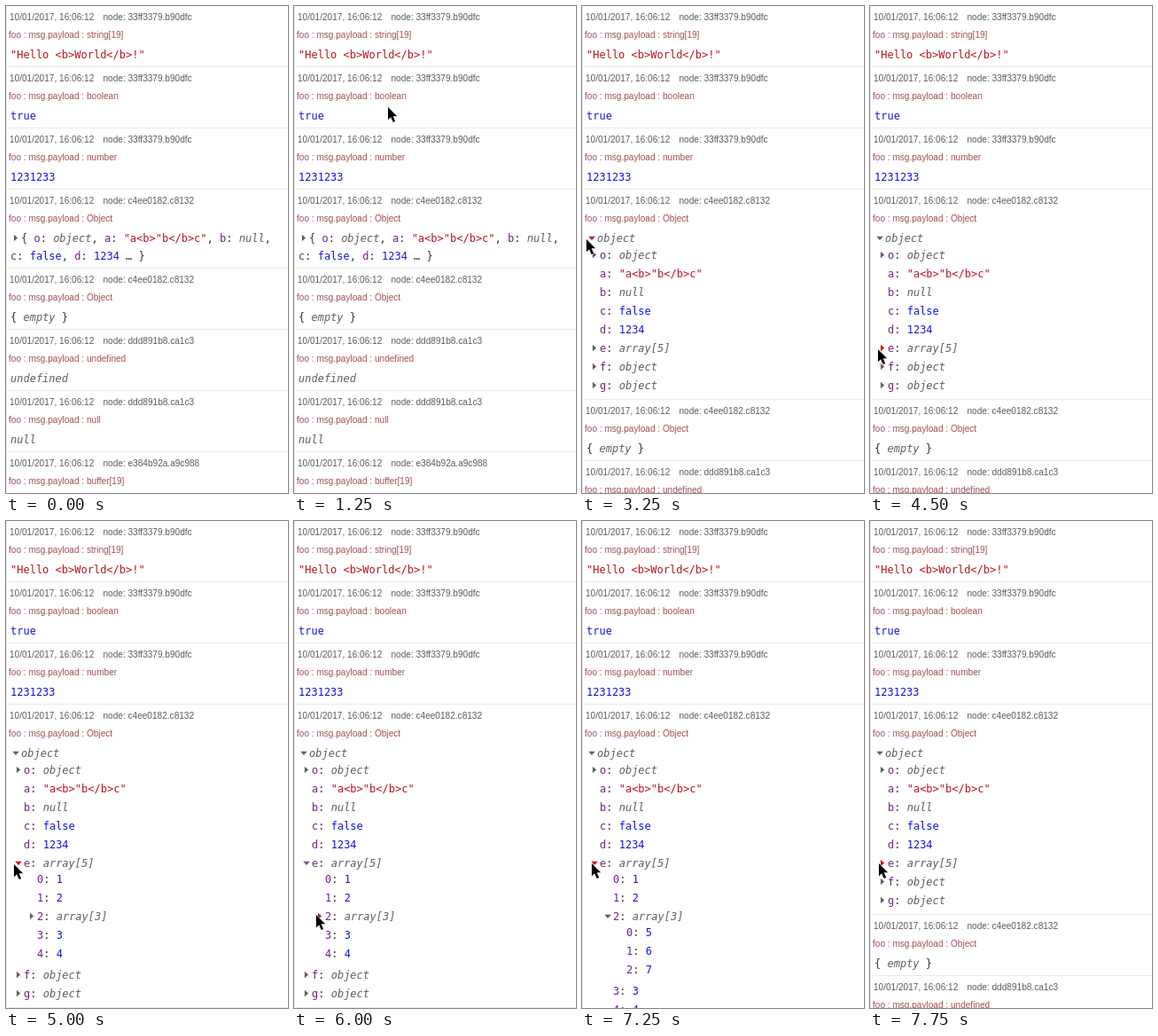
An HTML page for the animation above (8 s loop, 318 by 549 pixels).

```html
<!DOCTYPE html>
<html lang="en">
<head>
<meta charset="utf-8">
<title>Debug sidebar</title>
<style>
html, body { margin: 0; width: 100%; height: 100%; overflow: hidden; background: #fff; }
svg { display: block; }
text { white-space: pre; }
.info, .topic { font: 10.08px "Liberation Sans", Arial, sans-serif; fill: #5c5c5c; }
.topic { fill: #a34f4f; }
.mono { font: 12px "DejaVu Sans Mono", monospace; fill: #333; }
.key { fill: #70208a; }
.str { fill: #b3161c; }
.num { fill: #1018de; }
.meta { fill: #5e5e5e; font-style: italic; }
.rule { fill: #e9e9e9; }
.caret { fill: #606060; }
.hot { fill: #d01212; }
</style>
</head>
<body>
<svg width="318" height="549" viewBox="0 0 318 549">
  <rect class="rule" width="1" height="549"/>
  <g id="log"></g>
  <path id="cursor" d="M0 0V14.2L3.2 11.2L5.7 17L8.2 16L5.7 10.3H10.2Z" stroke="#fff" stroke-width="1" paint-order="stroke"/>
</svg>
<script>
const LOOP = 8000;
const log = document.getElementById('log');
const cursor = document.getElementById('cursor');

// Runs are "class|text", joined by "~".
const PREVIEW = [
  '|{ ~key|o~|: ~meta|object~|, ~key|a~|: ~str|"a<b>"b</b>c"~|, ~key|b~|: ~meta|null~|,',
  'key|c~|: ~num|false~|, ~key|d~|: ~num|1234~| … }'
];
const node = (key, value, children) => ({ key, value, children });
const TREE = [
  node('o', 'meta|object', []),
  node('a', 'str|"a<b>"b</b>c"'),
  node('b', 'meta|null'),
  node('c', 'num|false'),
  node('d', 'num|1234'),
  node('e', 'meta|array[5]', [
    node('0', 'num|1'),
    node('1', 'num|2'),
    node('2', 'meta|array[3]', [5, 6, 7].map((n, i) => node(String(i), 'num|' + n))),
    node('3', 'num|3'),
    node('4', 'num|4')
  ]),
  node('f', 'meta|object', []),
  node('g', 'meta|object', [])
];

const MESSAGES = [
  ['33ff3379.b90dfc', 'string[19]', 'str|"Hello <b>World</b>!"'],
  ['33ff3379.b90dfc', 'boolean', 'num|true'],
  ['33ff3379.b90dfc', 'number', 'num|1231233'],
  ['c4ee0182.c8132', 'Object', TREE],
  ['c4ee0182.c8132', 'Object', '|{ ~meta|empty~| }'],
  ['ddd891b8.ca1c3', 'undefined', 'meta|undefined'],
  ['ddd891b8.ca1c3', 'null', 'meta|null'],
  ['e384b92a.a9c988', 'buffer[19]', '']
];

// time, cursor x, cursor y, expanded nodes, highlighted caret
const STEPS = [
  [0, -50, -50, '', ''],
  [250, 144, 12, '', ''],
  [500, 132, 38, '', ''],
  [750, 124, 62, '', ''],
  [1250, 106, 114, '', ''],
  [1500, 66, 190, '', ''],
  [1750, 22, 256, '', ''],
  [2000, 6, 270, '', ''],
  [2250, 5, 265, '', 'root'],
  [2500, 5, 264, '', 'root'],
  [3250, 5, 263, 'root', 'root'],
  [3750, 7, 296, 'root', ''],
  [4000, 12, 370, 'root', ''],
  [4250, 10, 402, 'root', ''],
  [4500, 9, 387, 'root', 'e'],
  [5000, 9, 387, 'root e', 'e'],
  [5500, 13, 400, 'root e', ''],
  [5750, 21, 430, 'root e', ''],
  [6000, 25, 444, 'root e', '2'],
  [6500, 25, 444, 'root e 2', '2'],
  [6750, 20, 424, 'root e 2', ''],
  [7000, 13, 396, 'root e 2', ''],
  [7250, 11, 386, 'root e 2', 'e'],
  [7500, 10, 386, 'root e 2', 'e'],
  [7750, 10, 386, 'root', 'e']
];

const esc = s => s.replace(/&/g, '&amp;').replace(/</g, '&lt;');
const label = (x, y, cls, s) => `<text x="${x}" y="${y}" class="${cls}">${esc(s)}</text>`;

function mono(x, y, runs) {
  const spans = runs.split('~').map(run => {
    const cut = run.indexOf('|');
    return `<tspan class="${run.slice(0, cut)}">${esc(run.slice(cut + 1))}</tspan>`;
  });
  return `<text x="${x}" y="${y}" class="mono">${spans.join('')}</text>`;
}

function caret(x, y, open, hot) {
  const d = open ? `M${x - 9.7} ${y - 6.2}h7.6l-3.8 4.2z` : `M${x - 8} ${y - 8.3}v7.6l4.2 -3.8z`;
  return `<path class="${hot ? 'hot' : 'caret'}" d="${d}"/>`;
}

function drawLog(expanded, hot) {
  const open = new Set(expanded.split(' '));
  let out = '';

  // Draws sibling rows from baseline y and returns the last row's bottom baseline.
  function rows(list, x, y) {
    list.forEach((item, i) => {
      if (i) y += 21;
      const isOpen = open.has(item.key) && item.children;
      out += mono(x, y, `key|${item.key}~|: ~${item.value}`);
      if (item.children) out += caret(x, y, isOpen, hot === item.key);
      if (isOpen) y = rows(item.children, x + 15, y + 18) + 3;
    });
    return y;
  }

  function objectBody(y) {
    const isOpen = open.has('root');
    out += caret(17, y, isOpen, hot === 'root');
    if (isOpen) {
      out += mono(17, y, 'meta|object');
      return rows(TREE, 20, y + 19) + 11;
    }
    out += mono(17, y, PREVIEW[0]) + mono(5, y + 20, PREVIEW[1]);
    return y + 29;
  }

  let top = -1;
  for (const [id, type, body] of MESSAGES) {
    out += label(4, top + 17, 'info', '10/01/2017, 16:06:12');
    out += label(109.5, top + 17, 'info', 'node: ' + id);
    out += label(3, top + 37, 'topic', 'foo : msg.payload : ' + type);
    if (body === TREE) {
      top = objectBody(top + 60);
    } else {
      if (body) out += mono(5, top + 60, body);
      top += 69;
    }
    out += `<rect class="rule" y="${top}" width="318" height="1"/>`;
    if (top > 549) break;
  }
  log.innerHTML = out;
}

let shown = null;
function tick() {
  const t = performance.now() % LOOP;
  const step = STEPS.findLast(s => s[0] <= t);
  if (step !== shown) {
    const [, x, y, expanded, hot] = shown = step;
    drawLog(expanded, hot);
    cursor.setAttribute('transform', `translate(${x} ${y})`);
  }
  requestAnimationFrame(tick);
}
tick();
</script>
</body>
</html>
```
